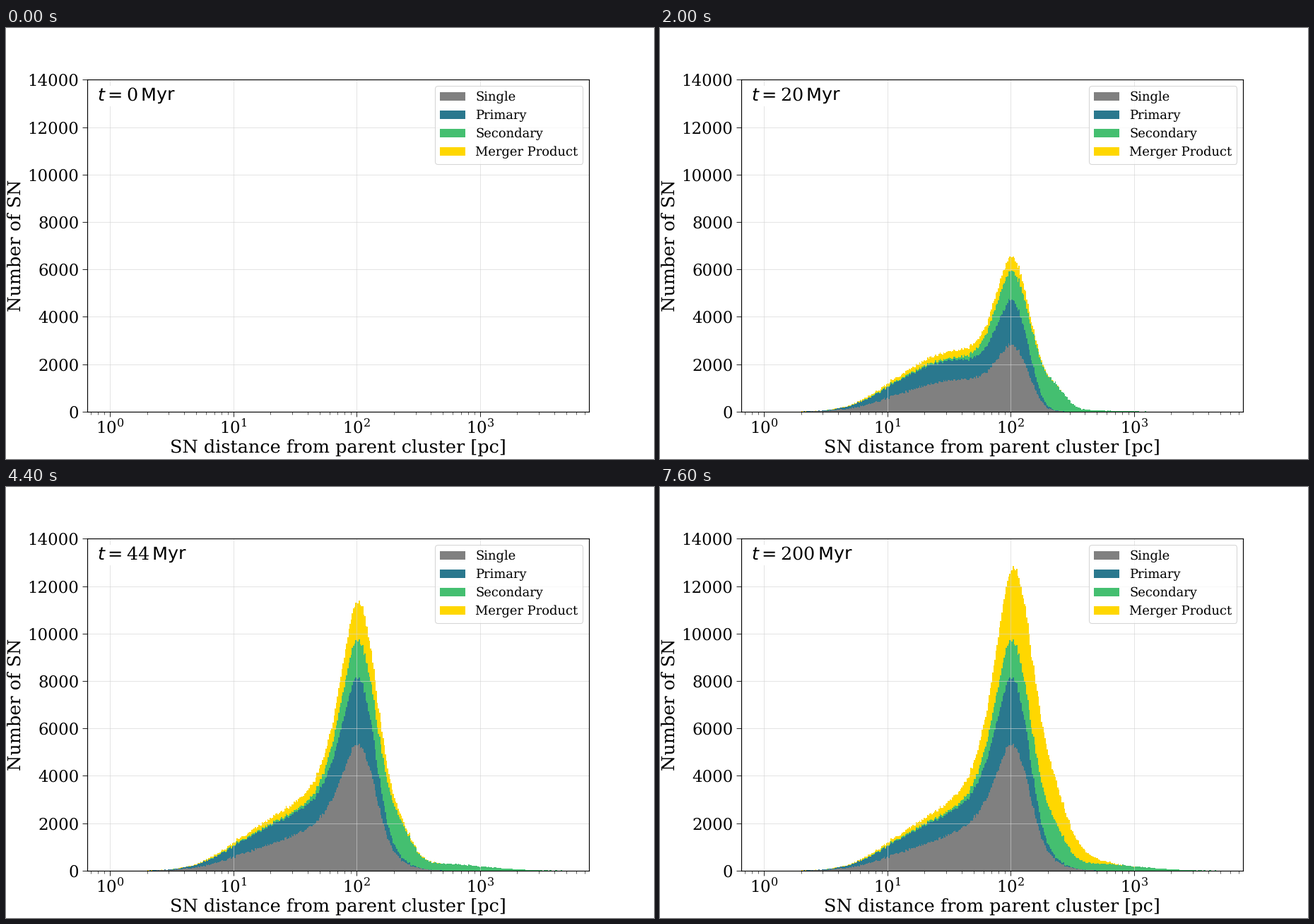
Animation, 917 px wide and 611 px high, one loop 7.8 s. Source, as a matplotlib script:

```python
import numpy as np
import matplotlib.pyplot as plt
from matplotlib.animation import FuncAnimation

W, H, DPI = 917, 611, 76.4
FS = 24
plt.rcParams.update({
    "font.family": "DejaVu Serif",
    "mathtext.default": "it",
    "mathtext.fontset": "dejavusans",
    "text.hinting": "none",
    "axes.linewidth": 1.1,
    "xtick.labelsize": 0.9 * FS,
    "ytick.labelsize": 0.9 * FS,
    "legend.fontsize": 0.7 * FS,
    "xtick.major.size": 7, "ytick.major.size": 7,
    "xtick.minor.size": 4,
    "xtick.major.pad": 2.8,
})

CLASSES = {"Single": "#808080", "Primary": "#2a788e",
           "Secondary": "#44bf70", "Merger Product": "#ffd700"}

# Time in Myr: fine steps first, then coarse ones
TIMES = [*range(0, 61, 2), *range(60, 201, 20)]

EDGES = np.geomspace(1, 5000, 401)
U = np.log10(np.sqrt(EDGES[1:] * EDGES[:-1]))


def bump(centre, left, right, p=2, q=2):
    """Unit bump exp(-|d/width|^power) with its own width on each side."""
    d = U - centre
    return np.exp(-np.where(d < 0, np.abs(d / left) ** p,
                            np.abs(d / right) ** q))


def new_events(last, t):
    """Expected supernovae per class and bin between two times."""
    active = np.clip((t - 2) / 3, 0, 1) * (t <= 44)
    reach = 0.28 + 1.18 * np.log10(t)

    # Stars drifting outwards, and a pile-up at 100 pc
    drift = active * 340 * np.exp(-t / 35) * bump(reach, 0.34, 0.245)
    pile = active * 585 * np.exp(-t / 17) * bump(2, 0.185, 0.195, 1.5, 2.4)
    single = drift + pile
    primary = single * 0.95 * np.exp(-t / 32)

    # Companions ejected when their primary explodes
    ejected = active * (165 * np.exp(-((t - 12) / 9) ** 2) + 12 * (t > 12))
    spread = np.clip(0.1 + 0.0075 * t, 0.18, 0.25)
    runaway = active * 22 * (t > 12) * bump(reach + 0.62, 0.28, 0.47)
    secondary = (ejected * bump(2, 0.22, 0.195, 2, 2.4)
                 + ejected * bump(2.27, 0.15, spread, 2, 3)
                 + runaway + 0.06 * drift)

    # Mergers follow the singles, then keep going with a long delay
    mid = (last + t) / 2
    late = 45 * np.clip((mid - 30) / 18, 0, 1) * np.exp(-(mid - 50) / 42)
    width = min(0.3, 0.0042 * mid)
    wing = bump(1.55 + 0.37 * np.log10(mid), 1.35 * width, width)
    merger = single * (0.16 + 0.005 * t) + late * (t - last) * wing
    return np.array([single, primary, secondary, merger])


def build_history():
    """Stacked bin heights for every step."""
    rng = np.random.default_rng(42)
    counts = np.zeros((len(CLASSES), U.size))
    history = [counts]
    for last, t in zip(TIMES, TIMES[1:]):
        if t > last:
            counts = counts + rng.poisson(new_events(last, t))
        history.append(counts.cumsum(axis=0))
    return history


HISTORY = build_history()

fig, ax = plt.subplots(figsize=((W + 0.01) / DPI, (H + 0.01) / DPI), dpi=DPI)
ax.set_xscale("log")
margin = 5000 ** 0.05
ax.set_xlim(1 / margin, 5000 * margin)
ax.set_ylim(0, 14000)
ax.grid(color="lightgrey", alpha=0.7, linewidth=0.8)

label = dict(fontsize=FS, ha="center", va="baseline", rotation_mode="anchor")
fig.text(0.5125, 9 / H, "SN distance from parent cluster [pc]", **label)
fig.text(20.3 / W, 0.495, "Number of SN", rotation=90, **label)

# Later classes lie behind earlier ones
layers = [ax.stairs(np.zeros(U.size), EDGES, fill=True, color=color,
                    label=name, zorder=1 - 0.01 * k)
          for k, (name, color) in enumerate(CLASSES.items())]
ax.legend(handles=layers, loc="upper right", labelspacing=0.475)

clock = ax.text(0.02, 0.98, "", transform=ax.transAxes, ha="left", va="top",
                fontsize=FS,
                bbox=dict(boxstyle="round,pad=0", fc="white", ec="white"))


def update(i):
    for layer, heights in zip(layers, HISTORY[i]):
        layer.set_data(values=heights)
    clock.set_text(rf"$t = \mathdefault{{{TIMES[i]}}}\,\rm Myr$")
    return [*layers, clock]


anim = FuncAnimation(fig, update, frames=len(TIMES), interval=200,
                     repeat=True, repeat_delay=0, blit=False)
plt.show()
```
